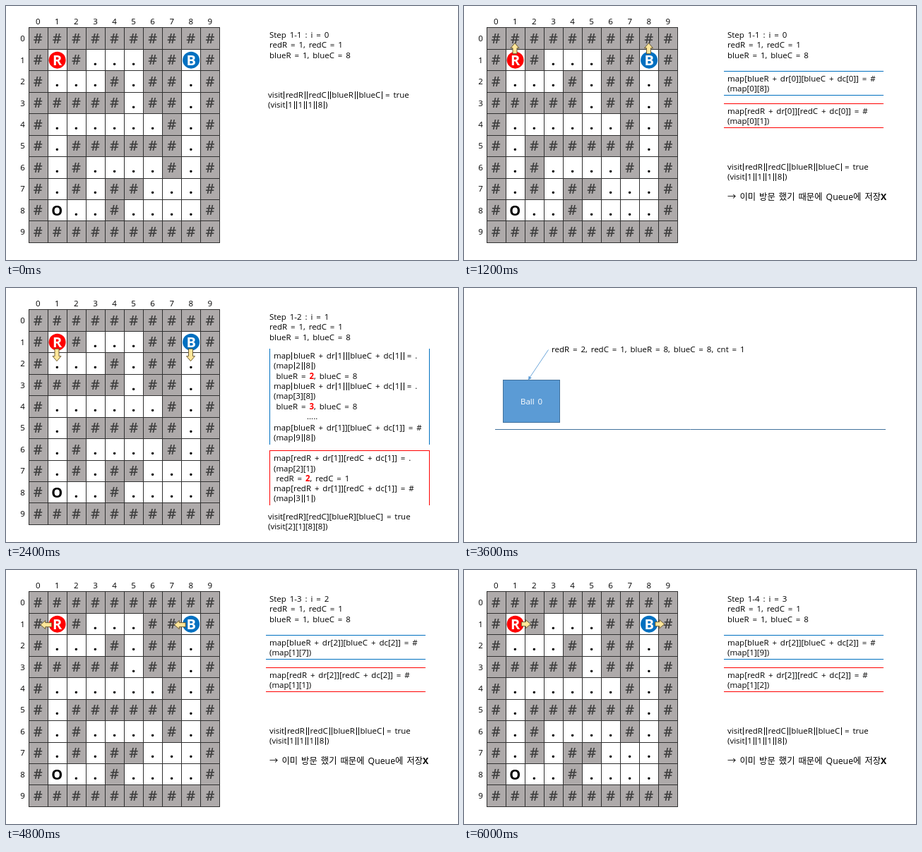
Animation, 640 px wide and 360 px high, one loop 7200 ms. Source, as an HTML page with a canvas:

```html
<!DOCTYPE html>
<html lang="ko">
<head>
<meta charset="utf-8">
<title>Ball maze search</title>
<style>
html, body { margin: 0; width: 100%; height: 100%; overflow: hidden; background: #fff; }
canvas { display: block; width: 100vw; height: 100vh; }
</style>
</head>
<body>
<canvas id="stage" width="640" height="360"></canvas>
<script>
const ctx = document.getElementById('stage').getContext('2d');
const FONT = '"Open Sans", "Noto Sans CJK KR", "Noto Sans CJK JP", "Noto Sans CJK", sans-serif';
const RED = '#ff0000', BLUE = '#0070c0', INK = '#000';
const SCENE_MS = 1200;

const MAZE = [
  '##########',
  '#R#...##B#',
  '#...#.##.#',
  '#####.##.#',
  '#......#.#',
  '#.######.#',
  '#.#....#.#',
  '#.#.##...#',
  '#O..#....#',
  '##########'
];
const LEFT = 31.7, TOP = 30.35, CELL_W = 27.07, CELL_H = 30.45;
const gridX = c => Math.round(LEFT + c * CELL_W);
const gridY = r => Math.round(TOP + r * CELL_H);
const midX = c => LEFT + (c + 0.5) * CELL_W;
const midY = r => TOP + (r + 0.5) * CELL_H + 0.6;

function setFont(size, weight = 400) {
  ctx.font = `${weight} ${size}px ${FONT}`;
}

function line(x1, y1, x2, y2, color, width = 1) {
  ctx.strokeStyle = color;
  ctx.lineWidth = width;
  ctx.beginPath();
  ctx.moveTo(x1, y1);
  ctx.lineTo(x2, y2);
  ctx.stroke();
}

// Draws one run and returns its width; thin brackets keep only their stems.
function run(str, x, y, size, thin) {
  if (!thin) {
    ctx.fillText(str, x, y);
    return ctx.measureText(str).width;
  }
  let pos = x;
  for (const part of str.split(/([\[\]])/)) {
    if (part === '[' || part === ']') {
      const stem = pos + size * (part === '[' ? 0.1 : 0.17);
      ctx.fillRect(Math.round(stem), y - 9, 1, 11);
    } else {
      ctx.fillText(part, pos, y);
    }
    pos += ctx.measureText(part).width;
  }
  return pos - x;
}

// Asterisks mark bold parts.
function text(str, x, y, { size = 11.5, thin = false, color = INK, bold = RED } = {}) {
  ctx.textAlign = 'left';
  ctx.wordSpacing = '1.9px';
  str.split('*').forEach((part, i) => {
    const strong = i % 2 === 1;
    setFont(size, strong ? 700 : 400);
    ctx.fillStyle = strong ? bold : color;
    x += run(part, x, y, size, thin);
  });
  ctx.wordSpacing = '0px';
}

function centred(str, x, y, size, weight, color) {
  setFont(size, weight);
  ctx.textAlign = 'center';
  ctx.fillStyle = color;
  ctx.fillText(str, x, y);
}

function ball(letter, x, y, color) {
  ctx.fillStyle = color;
  ctx.beginPath();
  ctx.arc(x, y, 12, 0, Math.PI * 2);
  ctx.fill();
  centred(letter, x, y + 7.3, 20, 700, '#fff');
}

function maze() {
  MAZE.forEach((row, r) => [...row].forEach((ch, c) => {
    if (ch !== '#') return;
    ctx.fillStyle = '#aeaaaa';
    ctx.fillRect(gridX(c), gridY(r), gridX(c + 1) - gridX(c), gridY(r + 1) - gridY(r));
  }));
  for (let i = 0; i <= 10; i++) {
    const x = gridX(i) + 0.5, y = gridY(i) + 0.5;
    line(x, gridY(0), x, gridY(10) + 1, '#303030');
    line(gridX(0), y, gridX(10) + 1, y, '#303030');
  }
  MAZE.forEach((row, r) => {
    centred(r, midX(r), 26, 11.5, 400, INK);
    centred(r, 23.5, midY(r) + 4, 11.5, 400, INK);
    [...row].forEach((ch, c) => {
      const x = midX(c), y = midY(r);
      if (ch === 'R') ball(ch, x + 0.3, y, RED);
      else if (ch === 'B') ball(ch, x + 0.3, y, BLUE);
      else if (ch === '#') centred(ch, x, y + 6.7, 20, 600, '#404040');
      else centred(ch, x, y + 7, 20, 700, INK);
    });
  });
}

// Block arrow whose tip is at (x, y), pointing along angle.
function blockArrow(x, y, angle, length) {
  ctx.save();
  ctx.translate(x, y);
  ctx.rotate(angle);
  ctx.beginPath();
  [[0, 0], [-7, -6], [-7, -3], [-length, -3], [-length, 3], [-7, 3], [-7, 6]]
    .forEach(([px, py]) => ctx.lineTo(px, py));
  ctx.closePath();
  ctx.fillStyle = '#ffe699';
  ctx.fill();
  ctx.strokeStyle = '#5f4f28';
  ctx.lineWidth = 0.9;
  ctx.stroke();
  ctx.restore();
}

function arrows(dx, dy, angle, length) {
  for (const c of [1, 8]) blockArrow(midX(c) + dx, midY(1) + dy, angle, length);
}

function heading(step) {
  text(`Step 1-${step} : i = ${step - 1}`, 373, 45);
  text('redR = 1, redC = 1', 373, 59);
  text('blueR = 1, blueC = 8', 373, 74);
}

function visit(x, y, cell, thin) {
  text('visit[redR][redC][blueR][blueC] = true', x, y, { thin });
  text(`(visit${cell})`, x, y + 14, { thin });
}

function probe(y, name, dir, cell, color) {
  line(368, y, 594, y, color);
  line(368, y + 34, 594, y + 34, color);
  text(`map[${name}R + dr[${dir}]][${name}C + dc[${dir}]] = #`, 373, y + 14.5);
  text(`(map${cell})`, 373, y + 28.5);
}

function blocked(step, dir, blueCell, redCell) {
  maze();
  heading(step);
  probe(92.5, 'blue', dir, blueCell, BLUE);
  probe(138.5, 'red', dir, redCell, RED);
  visit(373, 232, '[1][1][1][8]', true);
  text('→ 이미 방문 했기 때문에 Queue에 저장*X*', 373, 275, { size: 12.3, bold: INK });
}

function sides(top, bottom, color) {
  line(373.5, top, 373.5, bottom, color);
  line(599.5, top, 599.5, bottom, color);
}

function start() {
  maze();
  heading(1);
  visit(371, 130, '[1][1][1][8]', true);
}

function up() {
  blocked(1, 0, '[0][8]', '[0][1]');
  arrows(-0.3, -24, -Math.PI / 2, 15);
}

function down() {
  const thin = { thin: true };
  const move = (name, end) => `map[${name}R + dr[1]][${name}C + dc[1]] = ${end}`;
  maze();
  arrows(-0.3, 27, Math.PI / 2, 17.5);
  heading(2);

  sides(86, 222, BLUE);
  text(move('blue', '.'), 379, 100, thin);
  text('(map[2][8])', 379, 114, thin);
  text('blueR = *2*, blueC = 8', 382.5, 128.5);
  text(move('blue', '.'), 379, 143, thin);
  text('(map[3][8])', 379, 157);
  text('blueR = *3*, blueC = 8', 382.5, 172);
  text('.....', 426, 186);
  text(move('blue', '#'), 379, 201.5);
  text('(map[9][8])', 379, 216, thin);

  sides(230, 308, RED);
  line(373, 230.5, 600, 230.5, RED);
  text(move('red', '.'), 379, 245);
  text('(map[2][1])', 379, 259.5);
  text('redR = *2*, redC = 1', 382.5, 273.5);
  text(move('red', '#'), 379, 288);
  text('(map[3][1])', 379, 302, thin);

  visit(371, 327.5, '[2][1][8][8]', false);
}

function queue() {
  line(44, 200.5, 597, 200.5, '#41719c');
  ctx.fillStyle = '#5b9bd5';
  ctx.fillRect(55, 130, 81, 61);
  ctx.strokeStyle = '#41719c';
  ctx.lineWidth = 1;
  ctx.strokeRect(55.5, 130.5, 80, 60);
  text('Ball 0', 80, 165, { color: '#fff' });
  text('redR = 2, redC = 1, blueR = 8, blueC = 8, cnt = 1', 124, 91);

  line(119.5, 87.5, 93, 127, '#5b9bd5', 0.9);
  ctx.fillStyle = '#5b9bd5';
  ctx.beginPath();
  ctx.moveTo(91, 130.5);
  ctx.lineTo(91.6, 124.8);
  ctx.lineTo(95.8, 127.6);
  ctx.fill();
}

function left() {
  blocked(3, 2, '[1][7]', '[1][1]');
  arrows(-23.5, 1, Math.PI, 16);
}

function right() {
  blocked(4, 2, '[1][9]', '[1][2]');
  arrows(22, 0, 0, 13);
}

const scenes = [start, up, down, queue, left, right];
const began = performance.now();

function draw() {
  const t = Math.max(0, performance.now() - began);
  ctx.fillStyle = '#fff';
  ctx.fillRect(0, 0, 640, 360);
  scenes[Math.floor(t / SCENE_MS) % scenes.length]();
  requestAnimationFrame(draw);
}
draw();
</script>
</body>
</html>
```
